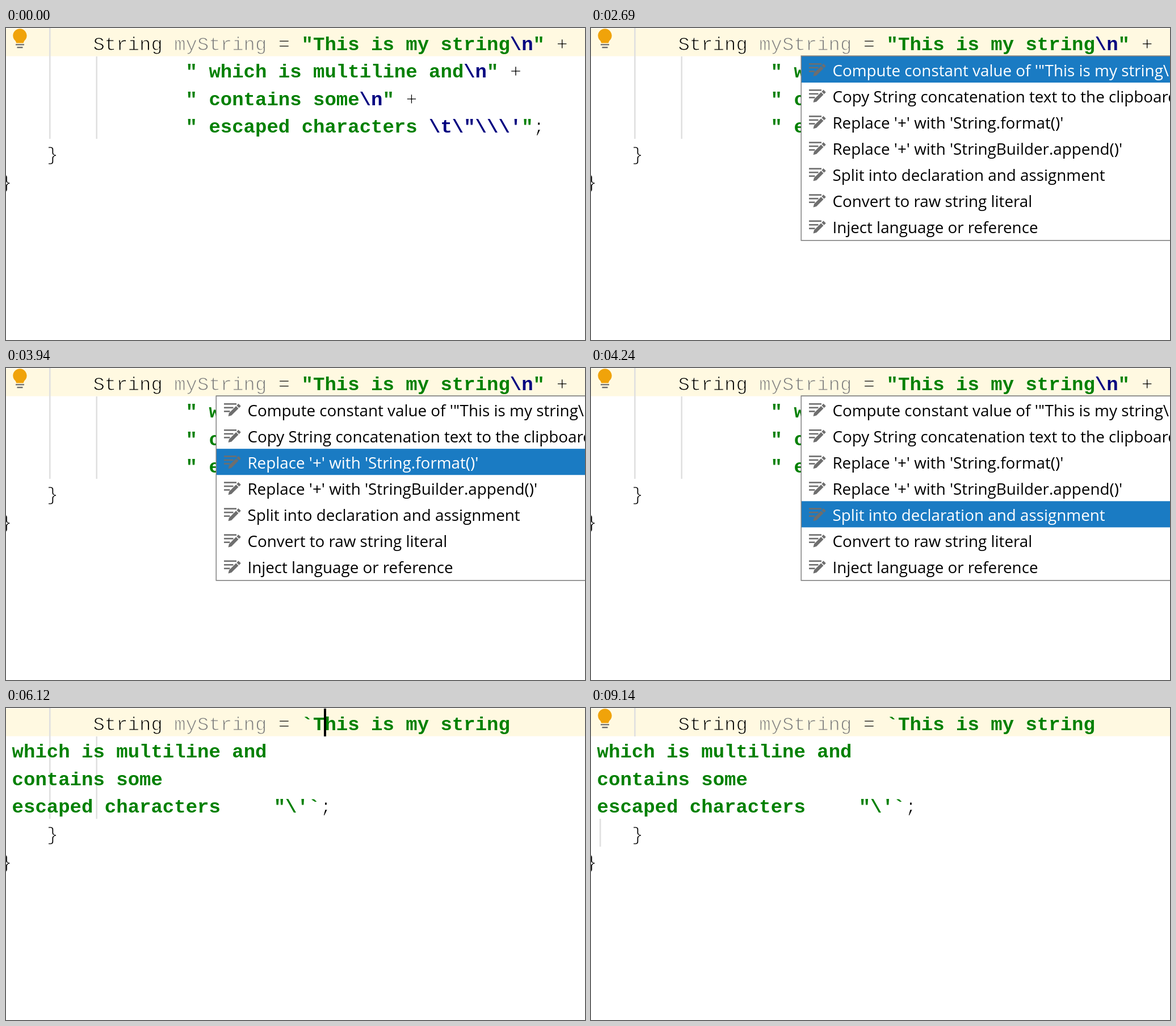
Animation of 1020 by 549 pixels, one loop 9610 ms. Source, as an HTML page with a canvas:

```html
<!DOCTYPE html>
<html lang="en">
<head>
<meta charset="utf-8">
<title>Raw string conversion</title>
<style>
  html, body { margin: 0; width: 100%; height: 100%; overflow: hidden; background: #fff; }
  canvas { display: block; }
</style>
</head>
<body>
<canvas id="stage" width="1020" height="549"></canvas>
<script>
const ctx = document.getElementById('stage').getContext('2d');
const LOOP = 9610;
const COL = 20.4, LEFT = 153.4, LINE = 48.65, BASE = 38.5;
const BLACK = '#000', UNUSED = '#808080', GREEN = '#008000', NAVY = '#000080';
const PAGE = '#fff', ACTIVE = '#fff9e1';
const GUIDE = '#e0e0e0', ICON = '#6e6e6e', ROW = 46.08;

const T = { click: 1365, popup: 2690, convert: 6120, reguide: 6430, bulb: 6960 };
const steps = [3770, 3940, 4090, 4240, 4410];
const caretOn = [[1365, 2290], [6120, 7130], [7590, 8140], [8670, 9140]];

// Pointer stops: time, x, y; a stop without a place hides it.
const pointer = [
  [0], [360, 792, 114], [438, 735, 75], [516, 655, 42], [594, 590, 18],
  [672, 555, 8], [750, 560, 10], [900, 566, 14], [1050, 566, 19],
  [1130, 566, 24], [1280, 574, 33], [1450],
  [8750, 630, 420], [8830, 679, 517], [8910]
];

const items = [
  'Compute constant value of \'"This is my string\\n" + " which is',
  'Copy String concatenation text to the clipboard',
  "Replace '+' with 'String.format()'",
  "Replace '+' with 'StringBuilder.append()'",
  'Split into declaration and assignment',
  'Convert to raw string literal',
  'Inject language or reference'
];

function rect(x, y, w, h, color) {
  ctx.fillStyle = color;
  ctx.fillRect(x, y, w, h);
}

// Draws runs of [text, color]; literals are bold, the rest is trimmed to a light weight.
function code(line, col, runs) {
  const y = BASE + line * LINE;
  for (const [text, color] of runs) {
    const x = LEFT + col * COL;
    const bold = color === GREEN || color === NAVY;
    ctx.font = (bold ? 'bold ' : '') + '34px "Liberation Mono", "Courier New", monospace';
    ctx.fillStyle = color;
    ctx.fillText(text, x, y);
    if (!bold) {
      ctx.lineWidth = 1.1;
      ctx.lineJoin = 'round';
      ctx.strokeStyle = line === 0 ? ACTIVE : PAGE;
      ctx.strokeText(text, x, y);
    }
    col += text.length;
  }
}

function guides(t) {
  if (t < T.reguide) {
    rect(76, 0, 2.6, 195, GUIDE);
    rect(158.4, 50, 2.6, 145, GUIDE);
  } else {
    rect(76, 0, 2.6, 50, GUIDE);
    rect(15, 195, 2.6, 49, GUIDE);
  }
}

function source(raw) {
  code(0, 0, [['String ', BLACK], ['myString', UNUSED], [' = ', BLACK]]);
  if (raw) {
    code(0, 18, [['`This is my string', GREEN]]);
    code(1, -7, [['which is multiline and', GREEN]]);
    code(2, -7, [['contains some', GREEN]]);
    code(3, -7, [['escaped characters', GREEN]]);
    code(3, 15.6, [['"\\\'`', GREEN], [';', BLACK]]);
  } else {
    code(0, 18, [['"This is my string', GREEN], ['\\n', NAVY], ['"', GREEN], [' +', BLACK]]);
    code(1, 8, [['" which is multiline and', GREEN], ['\\n', NAVY], ['"', GREEN], [' +', BLACK]]);
    code(2, 8, [['" contains some', GREEN], ['\\n', NAVY], ['"', GREEN], [' +', BLACK]]);
    code(3, 8, [['" escaped characters ', GREEN], ['\\t\\"\\\\\\\'', NAVY], ['"', GREEN], [';', BLACK]]);
  }
  code(4, -4, [['}', BLACK]]);
  code(5, -8, [['}', BLACK]]);
}

function bulb() {
  ctx.fillStyle = '#f0a30a';
  ctx.beginPath();
  ctx.arc(24.4, 13.4, 12.1, Math.PI * 0.82, Math.PI * 2.18);
  ctx.quadraticCurveTo(31, 23, 30.6, 26.6);
  ctx.lineTo(18.2, 26.6);
  ctx.quadraticCurveTo(17.8, 23, 14.2, 20);
  ctx.fill();
  rect(17, 28.2, 15, 2.2, ICON);
  rect(19.5, 33, 10, 2.4, ICON);
}

function icon(y) {
  rect(384, y, 22, 2.6, ICON);
  rect(384, y + 6.5, 16.5, 2.6, ICON);
  rect(384, y + 13, 10.5, 2.6, ICON);
  ctx.save();
  ctx.translate(391.5, y + 23);
  ctx.rotate(-Math.PI / 4);
  ctx.beginPath();
  ctx.moveTo(0, 0);
  ctx.lineTo(5, -3);
  ctx.lineTo(22.5, -3);
  ctx.lineTo(22.5, 3);
  ctx.lineTo(5, 3);
  ctx.fill();
  ctx.fillRect(24, -3, 4.5, 6);
  ctx.restore();
}

function popup(selected) {
  rect(369.5, 48.3, 660, 326.3, '#808080');
  rect(371, 50, 660, 323, PAGE);
  rect(371, 50 + selected * ROW, 649, ROW, '#1a7bc3');
  ctx.font = '27.8px "Open Sans", "Noto Sans", sans-serif';
  items.forEach((text, i) => {
    icon(62 + i * ROW);
    ctx.fillStyle = i === selected ? '#fff' : BLACK;
    ctx.fillText(text, 425.4, 84.6 + i * ROW);
  });
}

function beam(t) {
  const [, x, y] = pointer.filter(p => p[0] <= t).pop();
  if (x === undefined) return;
  rect(x - 1, y - 17, 2, 34, BLACK);
  for (const end of [-19, 17]) {
    rect(x - 9, y + end, 8, 2, BLACK);
    rect(x + 1, y + end, 8, 2, BLACK);
  }
}

function draw(t) {
  rect(0, 0, 1020, 549, PAGE);
  rect(0, 1, 1020, 48.6, ACTIVE);
  guides(t);
  source(t >= T.convert);
  if (t < T.click || (t >= T.popup && t < T.convert) || t >= T.bulb) bulb();
  if (caretOn.some(([a, b]) => t >= a && t < b)) rect(560, 1, 4, 49, BLACK);
  if (t >= T.popup && t < T.convert) popup(steps.filter(s => s <= t).length);
  beam(t);
}

const start = performance.now();
function tick() {
  draw((performance.now() - start) % LOOP);
  requestAnimationFrame(tick);
}
tick();
</script>
</body>
</html>
```
